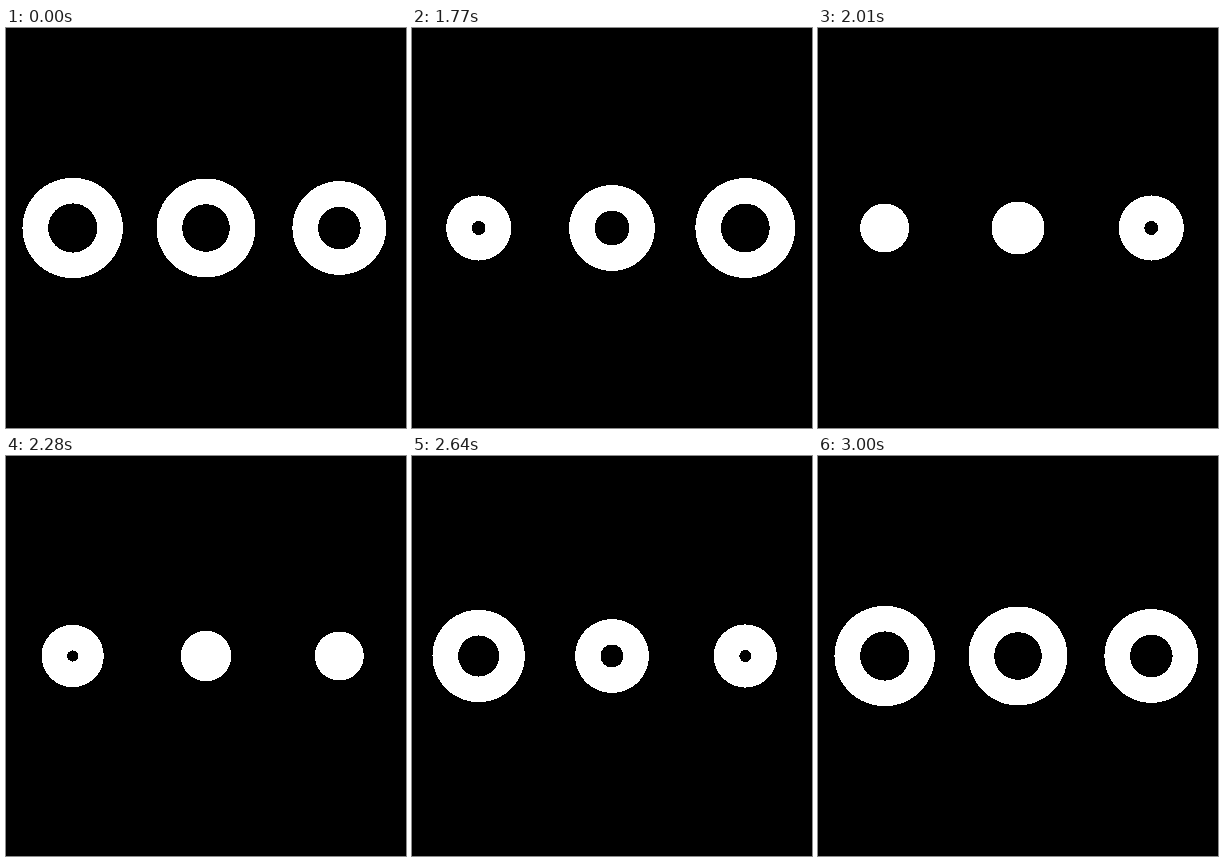
Write an HTML page that moves like this. It is 400 px wide and 400 px high and loops after 3030 ms.

```html
<!DOCTYPE html>
<html lang="en">
<head>
<meta charset="utf-8">
<title>Pulsing rings</title>
<style>
  html, body { margin: 0; width: 100%; height: 100%; overflow: hidden; background: #000; }
  svg { display: block; width: 100vw; height: 100vh; }
  circle { fill: #fff; shape-rendering: crispEdges; }
  .hole { fill: #000; }
</style>
</head>
<body>
<svg id="stage" viewBox="0 0 400 400"></svg>
<script>
const LOOP = 3030, HOLD = 1500, CYCLE = 1500, STEP = 30;
const BIG = 50.2, SMALL = 24.5, BAND = 25.6, SHRINK = 530;

// Cubic Bezier easing with handles (a, 0) and (b, 1)
function bezier(a, b) {
  return x => {
    if (x <= 0) return 0;
    if (x >= 1) return 1;
    let lo = 0, hi = 1;
    for (let i = 0; i < 24; i++) {
      const s = (lo + hi) / 2, q = 1 - s;
      if (3 * s * q * q * a + 3 * s * s * q * b + s * s * s < x) lo = s;
      else hi = s;
    }
    return lo * lo * (3 - 2 * lo);
  };
}

const snappy = bezier(0.33, 0.4), gentle = bezier(0.45, 0.57);

// start: shrinking begins, turn: growing begins
const rings = [
  { start: 0, turn: 510, grow: snappy },
  { start: 120, turn: 660, grow: gentle },
  { start: 240, turn: 780, grow: gentle }
];

const stage = document.getElementById('stage');

function addCircle(cx, name) {
  const c = document.createElementNS('http://www.w3.org/2000/svg', 'circle');
  c.setAttribute('cx', cx);
  c.setAttribute('cy', 200);
  c.setAttribute('class', name);
  return stage.appendChild(c);
}

rings.forEach((ring, i) => {
  const cx = 400 * (i + 0.5) / 3;
  ring.disc = addCircle(cx, 'disc');
  ring.hole = addCircle(cx, 'hole');
});

function radius({ start, turn, grow }, u) {
  if (u < start) u += CYCLE;
  const size = u < turn
    ? 1 - snappy((u - start) / SHRINK)
    : grow((u - turn) / (start + CYCLE - turn));
  return SMALL + (BIG - SMALL) * size;
}

function draw(now) {
  const t = Math.floor(now % LOOP / STEP) * STEP;
  const u = Math.max(0, t - HOLD) % CYCLE;
  for (const ring of rings) {
    const r = radius(ring, u), inner = r - BAND;
    ring.disc.setAttribute('r', r.toFixed(2));
    ring.hole.setAttribute('r', inner < 1 ? 0 : inner.toFixed(2));
  }
}

function tick() {
  draw(performance.now() - begin);
  requestAnimationFrame(tick);
}

const begin = performance.now();
tick();
</script>
</body>
</html>
```
